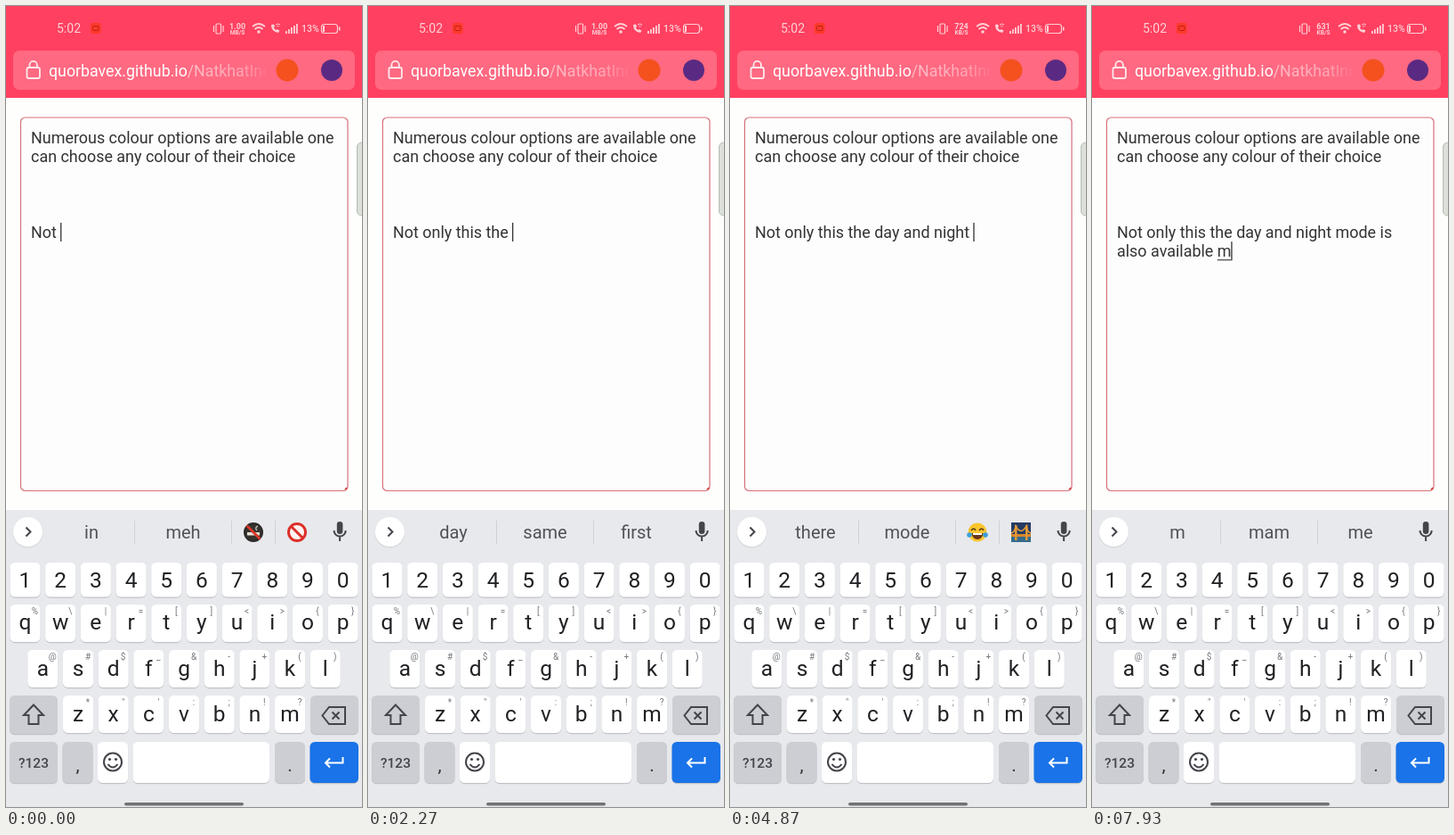
An HTML page with a canvas for the animation above (8000 ms loop, 400 by 898 pixels).

```html
<!DOCTYPE html>
<html lang="en">
<head>
<meta charset="utf-8">
<style>
html, body { margin: 0; width: 100%; height: 100%; overflow: hidden; background: #fefefc; }
canvas { display: block; width: 400px; height: 898px; }
</style>
</head>
<body>
<canvas id="stage"></canvas>
<script>
const canvas = document.getElementById('stage');
const ctx = canvas.getContext('2d');
const ratio = window.devicePixelRatio || 1;
canvas.width = 400 * ratio;
canvas.height = 898 * ratio;
ctx.scale(ratio, ratio);

const LOOP = 8000;
const HOLD = 60;        // how long a key stays down before the suggestions update
const TEXT_DELAY = 65;  // press to letter on the page
const FONT_SIZE = 17.93, LINE = 21.2;
const INK = '#333333', ICON = '#43454a', STATUS = '#ffd0d6';
const KEY = '#ffffff', DARK_KEY = '#cdced3';
const INTRO = ['Numerous colour options are available one', 'can choose any colour of their choice'];
const ROWS = [
  { keys: '1234567890', hints: '', x: 21.5, y: 624, h: 38.5, baseline: 652.3 },
  { keys: 'qwertyuiop', hints: '%\\|=[]<>{}', x: 21.5, y: 671, h: 42, baseline: 699 },
  { keys: 'asdfghjkl', hints: '@#$_&-+()', x: 41.3, y: 722, h: 42, baseline: 750.5 },
  { keys: 'zxcvbnm', hints: '*"\':;!?', x: 81, y: 773, h: 42, baseline: 802 }
];
const KEY_STEP = 39.68;

// [press time, key or tapped suggestion, suggestions that follow]
// a leading * marks the autocorrection; functions draw emoji
const presses = [
  [70, 'o', ['o', 'of', 'on']], [200, 'n', ['on', 'only', 'one']],
  [530, 'l', ['onl', 'only', 'online']], [665, 'y', ['only', 'only the', 'onlye']],
  [765, ' ', ['the', 'for', 'a']], [865, 't', ['t', 'the', 'to']],
  [1070, 'h', ['th', 'the', 'this']], [1270, 'i', ['thi', 'this', 'think']],
  [1400, 's', ['this', 'thus', 'these']], [1530, ' ', ['is', 'time', 'one']],
  [1608, 't', ['t', 'time', 'to']], [1870, 'h', ['th', 'the', 'this']],
  [2000, 'e', ['the', 'they', 'then']], [2200, ' ', ['day', 'same', 'first']],
  [2400, 'f', ['f', 'first', 'for']], [2600, 'a', ['fa', 'day', 'far']],
  [2800, 'u', ['fau', '*day', 'fault']], [3065, ' '],
  [3470, 'a', ['a', 'and', 'at']], [3670, 'n', ['an', 'and', 'any']],
  [3870, 'd', ['and', 'ands', 'andy']], [4070, ' ', ['the', 'night', 'I']],
  [4330, 'n', ['n', 'night', 'not']], [4435, 'i', ['ni', 'night', 'nice']],
  [4535, 'g', ['nig', 'night', 'nights']], [4630, 'h', ['nigh', 'night', 'nights']],
  [4720, 't', ['night', 'nights', 'nightly']], [4800, ' ', ['there', 'mode', joy, bridge]],
  [5270, 'mode ', ['is', 'of', 'and']], [5665, 'i', ['i', 'is', 'in']],
  [5870, 's', ['is', 'isn\'t', 'its']], [6000, ' ', ['not', 'also', 'the']],
  [6130, 'a', ['a', 'also', 'available']], [6265, 'l', ['al', 'also', 'all']],
  [6338, 's', ['als', 'also', 'ala']], [6530, 'o', ['also', 'alsop', 'alsoo']],
  [6730, ' ', ['available', 'there', 'a']], [6900, 'a', ['a', 'available', 'and']],
  [7065, 'v', ['av', 'available', 'avail']], [7470, 'available ', ['in', 'for', 'on']],
  [7865, 'm', ['m', 'mam', 'me']]
];
const speeds = [[0, '1.00 MB/S'], [3670, '724 KB/S'], [6930, '631 KB/S']];

const at = (steps, t) => steps.filter(([start]) => start <= t).pop()[1];

// Replays the presses up to time t.
function typingState(t) {
  let typed = 'Not ', bar = ['in', 'meh', noSmoking, prohibited], held = '';
  for (const [start, key, next] of presses) {
    if (t >= start && t < start + HOLD && key.length === 1) held = key;
    if (t >= start + TEXT_DELAY) {
      const correction = bar.find(item => item[0] === '*');
      if (key === ' ' && correction) typed = typed.replace(/\S*$/, correction.slice(1));
      if (key.length > 1) typed = typed.replace(/\S*$/, '');
      typed += key;
    }
    if (t >= start + HOLD && next) bar = next;
  }
  return { typed, bar, held };
}

function text(str, x, y, size, color = INK, align = 'left', weight = 400) {
  ctx.font = `${weight} ${size}px Roboto, sans-serif`;
  ctx.textAlign = align;
  ctx.fillStyle = color;
  ctx.fillText(str, x, y);
  return ctx.measureText(str).width;
}
function rect(x, y, w, h, color) {
  ctx.fillStyle = color;
  ctx.fillRect(x, y, w, h);
}
function box(x, y, w, h, r, fill, stroke, width = 1) {
  ctx.beginPath();
  ctx.roundRect(x, y, w, h, r);
  paint(fill, stroke, width);
}
function circle(x, y, r, fill, stroke, width = 1) {
  ctx.beginPath();
  ctx.arc(x, y, r, 0, Math.PI * 2);
  paint(fill, stroke, width);
}
function path(d, fill, stroke, width = 1) {
  const shape = new Path2D(d);
  if (fill) { ctx.fillStyle = fill; ctx.fill(shape); }
  if (stroke) { ctx.strokeStyle = stroke; ctx.lineWidth = width; ctx.stroke(shape); }
}
function paint(fill, stroke, width) {
  if (fill) { ctx.fillStyle = fill; ctx.fill(); }
  if (stroke) { ctx.strokeStyle = stroke; ctx.lineWidth = width; ctx.stroke(); }
}

function prohibited(x, y) {
  circle(x, y, 9.5, '#fff4f2', '#dc2f28', 3);
  path(`M${x - 7} ${y - 7}l14 14`, null, '#dc2f28', 3);
}
function noSmoking(x, y) {
  circle(x, y, 10, '#35332f', '#2b2a28', 2);
  rect(x - 7, y, 14, 3.5, '#e8dfd6');
  path(`M${x + 4} ${y - 2}q-3 -3 1 -5`, null, '#bbb8b0', 1.5);
  path(`M${x - 7.5} ${y - 7.5}l15 15`, null, '#d8372a', 3);
}
function joy(x, y) {
  circle(x, y, 10.5, '#fcc62f');
  path(`M${x - 7} ${y - 2}q3 -4 5 0M${x + 2} ${y - 2}q3 -4 5 0`, null, '#5d4116', 1.6);
  path(`M${x - 6.5} ${y + 1}h13q-1 7 -6.5 7t-6.5 -7z`, '#6b3717');
  rect(x - 5, y + 1, 10, 2, '#fff');
  for (const side of [-1, 1]) circle(x + side * 9, y + 3, 2.8, '#3a9fdc');
}
function bridge(x, y) {
  rect(x - 11, y - 11, 22, 22, '#263c63');
  rect(x - 11, y + 5, 22, 6, '#346b8d');
  path(`M${x - 11} ${y + 1}q4 -1 5 -8q6 11 12 0q1 7 5 8`, null, '#eda435', 1.5);
  rect(x - 11, y + 2, 22, 3, '#d9842c');
  for (const dx of [-7, 5]) rect(x + dx, y - 8, 2.5, 17, '#e39a36');
}

function drawStatus(t) {
  text('5:02', 57, 30, 14, STATUS);
  box(95, 19, 11.5, 12, 2.5, '#ff3a28');
  box(97.5, 22.5, 6.5, 5, 1, null, '#b8201c');
  box(236, 20, 5.5, 11, 1, null, STATUS, 1.2);
  path('M233.5 22v7M244 22v7', null, STATUS, 1.2);
  const [amount, unit] = at(speeds, t).split(' ');
  text(amount, 260, 25.5, 9, STATUS, 'center', 700);
  text(unit, 260, 32, 6.6, STATUS, 'center', 700);
  path('M277 23q7 -6 14 0M279.5 26q4.5 -4 9 0', null, STATUS, 1.7);
  circle(284, 29, 1.8, STATUS);
  path('M298 21q0 8 8 9l1.5 -2.5l-3 -1.5l-1 1q-2 -1 -2.5 -3l1 -1l-1 -2.5z', STATUS);
  path('M303 21q2.5 -2 5 0M304.3 23q1.2 -1 2.4 0', null, STATUS, 1);
  for (let i = 0; i < 5; i++) rect(314 + i * 3, 28 - i * 2, 1.8, 3 + i * 2, STATUS);
  text('13%', 332, 29, 10.5, STATUS, 'left', 500);
  box(354.5, 20.5, 18, 10, 3, null, STATUS, 1.2);
  rect(356, 22, 2, 7, STATUS);
  rect(374, 23.5, 1.5, 4, STATUS);
}

function drawAddress() {
  box(8, 50, 384, 44, 7, '#ff6981');
  box(23.5, 69, 14.5, 12, 2, null, '#ffe9ec', 1.8);
  path('M26.5 69v-3a4.2 4.2 0 0 1 8.4 0v3', null, '#ffe9ec', 1.8);
  const hostWidth = text('quorbavex.github.io', 48, 78.5, 17.78, '#ffffff');
  const fade = ctx.createLinearGradient(204, 0, 293, 0);
  fade.addColorStop(0, 'rgba(255,225,230,.7)');
  fade.addColorStop(0.7, 'rgba(255,225,230,.5)');
  fade.addColorStop(1, 'rgba(255,225,230,.05)');
  ctx.save();
  ctx.beginPath();
  ctx.rect(200, 55, 92, 35);
  ctx.clip();
  text('/NatkhatInd', 48 + hostWidth, 78.5, 17.78, fade);
  ctx.restore();
  circle(316, 72, 12.5, '#f4511f');
  circle(366, 72, 12, '#5a2a83');
}

function drawEditor(typed) {
  box(16.5, 125, 367.5, 418.5, 5, '#fdfdfd', '#d8707a', 1.2);
  path('M381 542l2 -2', null, '#cf3b30', 1.5);
  box(394.5, 153, 12, 82, 5, '#dcdfda', '#b4beb0');
  INTRO.forEach((line, i) => text(line, 28, 153.5 + i * LINE, FONT_SIZE));

  const lines = [];
  for (const word of typed.split(' ')) {
    const joined = lines.length ? lines[lines.length - 1] + ' ' + word : word;
    if (lines.length && ctx.measureText(joined).width < 342) lines[lines.length - 1] = joined;
    else lines.push(word);
  }
  lines.forEach((line, i) => text(line, 28, 259.5 + i * LINE, FONT_SIZE));

  // the word being composed is underlined
  const last = lines[lines.length - 1];
  const baseline = 259.5 + (lines.length - 1) * LINE;
  const caret = 28 + ctx.measureText(last).width;
  const wordWidth = ctx.measureText(last.split(' ').pop()).width;
  rect(caret - wordWidth, baseline + 3.5, wordWidth, 1.1, INK);
  rect(caret - 0.2, baseline - 16.5, 1.3, 21, INK);
}

function drawSuggestions(items) {
  circle(24.5, 590.5, 17, '#d8dade');
  circle(24.5, 589.5, 16.5, KEY);
  path('M22.5 584.5l5 5l-5 5', null, ICON, 2);
  const emoji = items.length === 4;
  const centers = emoji ? [96, 199, 278, 327] : [96, 199, 301.5];
  items.forEach((item, i) => {
    if (typeof item === 'function') return item(centers[i], 590);
    const bold = item[0] === '*';
    text(bold ? item.slice(1) : item, centers[i], 597, 20, bold ? '#252628' : '#505257', 'center', bold ? 700 : 400);
  });
  for (const x of emoji ? [144, 253, 302] : [144, 253]) rect(x, 577, 1, 26, '#cfd1d5');
  box(371.8, 578, 6.6, 14, 3.3, ICON);
  path('M368.5 588a6.6 6.6 0 0 0 13.2 0M375.1 595v5', null, ICON, 2);
}

function key(x, y, w, h, fill = KEY) {
  box(x, y + 1.2, w, h, 5.5, '#c0c2c7');
  box(x, y, w, h, 5.5, fill);
}
function keyRow({ keys, hints, x: first, y, h, baseline }) {
  [...keys].forEach((letter, i) => {
    const x = first + i * KEY_STEP;
    key(x - 17, y, 34, h);
    text(letter, x, baseline, 24.5, '#202124', 'center');
    if (hints) text(hints[i], x + 11, y + 11, 10, '#74767b', 'center');
  });
}
function keyPopup(letter) {
  const row = ROWS.find(({ keys }) => keys.includes(letter));
  const x = row.x + row.keys.indexOf(letter) * KEY_STEP;
  ctx.save();
  ctx.shadowColor = 'rgba(0,0,0,.3)';
  ctx.shadowBlur = 5 * ratio;
  ctx.shadowOffsetY = ratio;
  box(x - 23, row.y - 52, 46, row.h + 52, 9, KEY);
  ctx.restore();
  text(letter, x, row.y - 17, 33, '#202124', 'center');
}

function drawKeyboard(bar, held) {
  rect(0, 565, 400, 333, '#e7e9ed');
  drawSuggestions(bar);
  ROWS.forEach(keyRow);

  key(4, 773, 54, 43, DARK_KEY);
  path('M31 783.5l11 11.5h-5.5v10h-11v-10h-5.5z', null, ICON, 2);
  key(342, 773, 54, 43, DARK_KEY);
  path('M363 786h18v19h-18l-7.5 -9.5zM366.5 791.5l8 8m0 -8l-8 8', null, ICON, 2);

  key(4, 825, 54, 46, DARK_KEY);
  text('?123', 31, 854, 15.5, ICON, 'center', 500);
  key(63.5, 825, 34, 46, DARK_KEY);
  text(',', 80.5, 858, 21, INK, 'center');
  key(103, 825, 34, 46);
  circle(120, 847.5, 10, null, ICON, 2);
  circle(116.5, 844.5, 1.6, ICON);
  circle(123.5, 844.5, 1.6, ICON);
  path('M114.5 850q5.5 7 11 0', null, ICON, 2);
  key(142.5, 825, 153.5, 46, held === ' ' ? DARK_KEY : KEY);
  key(302, 825, 34, 46, DARK_KEY);
  text('.', 319, 858, 21, INK, 'center');
  key(341.5, 825, 54.5, 46, '#1a73e8');
  path('M378.5 842v6.5h-19M364 843.5l-5 5l5 5', null, '#ffffff', 2);
  box(133, 893, 134, 3.5, 1.8, '#717276');
  if (held.trim()) keyPopup(held);
}

function draw(now) {
  const t = now % LOOP;
  const { typed, bar, held } = typingState(t);
  rect(0, 0, 400, 898, '#fefefc');
  rect(0, 0, 400, 103, '#ff4060');
  drawStatus(t);
  drawAddress();
  drawEditor(typed);
  drawKeyboard(bar, held);
  requestAnimationFrame(draw);
}
requestAnimationFrame(draw);
</script>
</body>
</html>
```
